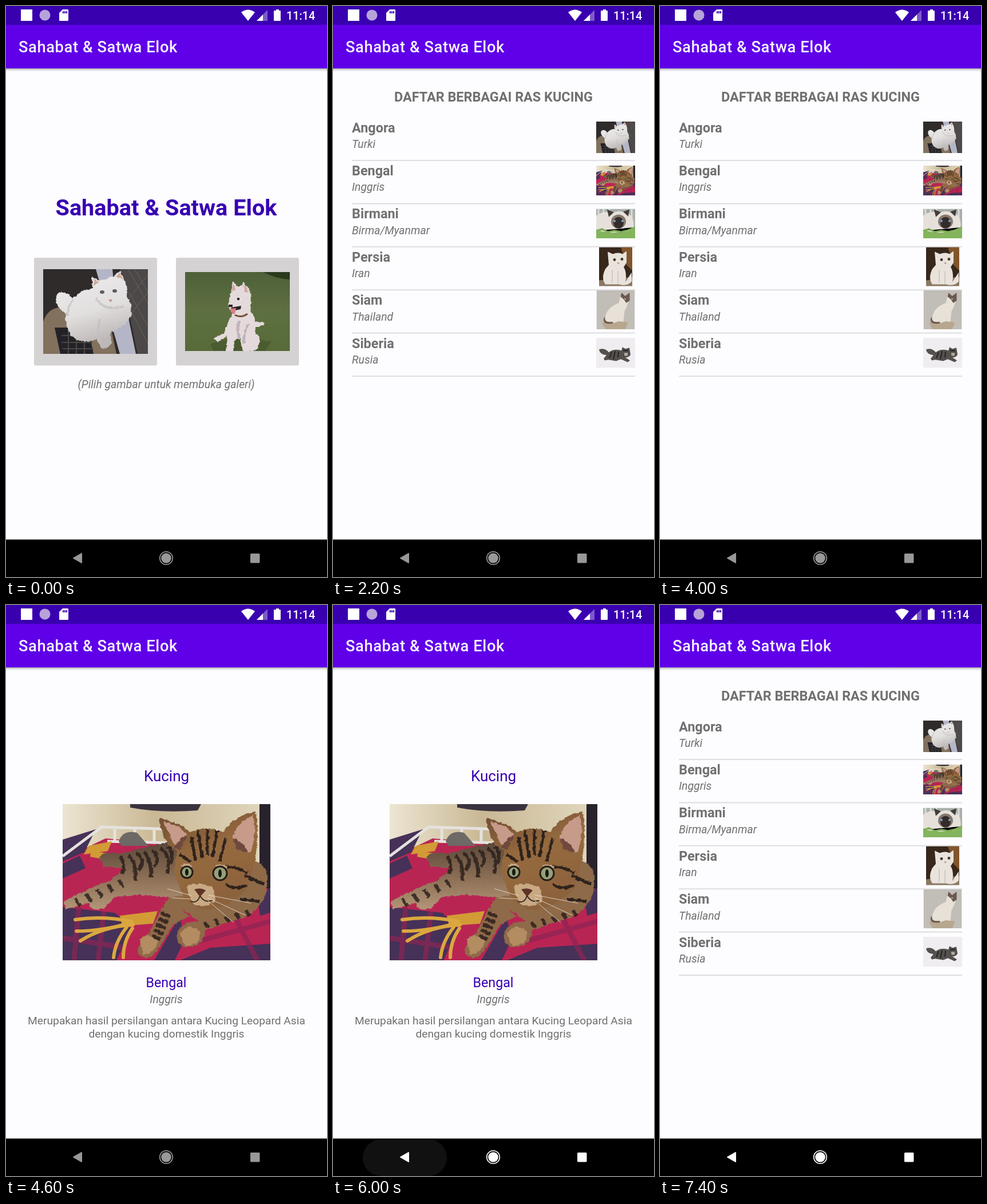
An HTML page for the animation above (8 s loop, 561 by 998 pixels).

```html
<!DOCTYPE html>
<html lang="id">
<meta charset="utf-8">
<title>Sahabat &amp; Satwa Elok</title>
<style>
  html, body { margin: 0; width: 100%; height: 100%; overflow: hidden; background: #000; }
  svg { display: block; }
  text { font-family: Roboto, sans-serif; fill: #707070; }
  .mid { text-anchor: middle; }
  .bold { font-weight: 700; font-size: 23.4px; }
  .body { font-size: 19.22px; }
  .it { font-style: italic; font-size: 19.4px; }
  .deep { fill: #3700b3; }
  .fur { filter: url(#fuzz); }
</style>
<svg id="stage" width="561" height="998" viewBox="0 0 561 998">
  <defs>
    <linearGradient id="shade" x2="0" y2="1">
      <stop stop-color="#000" stop-opacity=".34"/><stop offset=".5" stop-color="#000" stop-opacity=".09"/><stop offset="1" stop-color="#000" stop-opacity="0"/>
    </linearGradient>
    <linearGradient id="lawn" x2="0" y2="1">
      <stop stop-color="#4e6038"/><stop offset=".5" stop-color="#5e7041"/><stop offset="1" stop-color="#576a37"/>
    </linearGradient>
    <linearGradient id="wall" x2="1" y2="0">
      <stop stop-color="#ece5d2"/><stop offset=".45" stop-color="#c9b894"/><stop offset="1" stop-color="#e2d8bf"/>
    </linearGradient>
    <linearGradient id="flank" x2="0" y2="1">
      <stop stop-color="#594638"/><stop offset=".55" stop-color="#8f7258"/><stop offset="1" stop-color="#b79a7b"/>
    </linearGradient>
    <linearGradient id="face" x2=".4" y2="1">
      <stop stop-color="#6f4c30"/><stop offset=".5" stop-color="#966a3f"/><stop offset="1" stop-color="#8c623c"/>
    </linearGradient>
    <linearGradient id="white" x2=".3" y2="1">
      <stop stop-color="#efedee"/><stop offset=".6" stop-color="#e2dfdf"/><stop offset="1" stop-color="#bdb8b7"/>
    </linearGradient>
    <filter id="fuzz" x="-5%" y="-5%" width="110%" height="110%">
      <feTurbulence type="fractalNoise" baseFrequency=".16" numOctaves="2" seed="4"/>
      <feDisplacementMap in="SourceGraphic" scale="6" xChannelSelector="R" yChannelSelector="G"/>
      <feGaussianBlur stdDeviation=".5"/>
    </filter>

    <symbol id="angora" viewBox="0 0 183 148" preserveAspectRatio="none">
      <path fill="#2f2b2a" d="M0 0H183V148H0z"/>
      <path fill="#4c4847" d="M134 0H183V148H165z"/>
      <path fill="#b4b5c6" d="M92 0H121L124 30L150 90L162 148H134z"/>
      <path stroke="#696361" fill="none" d="M148 0L183 60M160 0L183 40M183 10L150 50M183 40L152 80M150 40L183 100M152 70L183 130"/>
      <path fill="#82715d" d="M0 148V92Q8 66 36 66L118 100L128 148z"/>
      <path fill="#232227" d="M20 102H78L88 148H30z"/>
      <path stroke="#4b4745" stroke-width="2" d="M32 116H82M32 128H86M34 139H88M44 104V148M58 104V148M72 104V148"/>
      <g class="fur">
        <path fill="url(#white)" d="M21 50Q24 40 36 40Q46 42 52 52Q64 36 86 34L85 14L102 20Q113 15 123 13L134 3L143 20Q147 35 146 48Q159 66 152 84Q140 104 118 109L119 130Q111 141 101 137L94 122Q70 134 50 117Q36 98 40 78Q24 68 21 50z"/>
        <path fill="none" stroke="#c3bebf" stroke-width="4" opacity=".7" d="M92 50Q106 76 141 64M99 87Q92 108 101 130M52 54Q42 66 42 82"/>
        <path fill="#cda99b" d="M87 17L98 22L90 29zM126 14L134 6L139 18z"/>
      </g>
      <path fill="#59605d" d="M99 40a4 3 0 1 0 8 0a4 3 0 1 0-8 0M121 38a4 3 0 1 0 8 0a4 3 0 1 0-8 0"/>
      <path fill="#c88f8b" d="M114 53H121L118 58z"/>
    </symbol>

    <symbol id="dog" viewBox="0 0 183 138" preserveAspectRatio="none">
      <path fill="url(#lawn)" d="M0 0H183V138H0z"/>
      <path fill="#2b3a1d" d="M136 0H183V13Q160 12 136 0z"/>
      <path fill="#42532c" opacity=".6" d="M44 126Q90 108 150 122L140 138H50z"/>
      <g class="fur">
        <path fill="#e4dadb" d="M80 36L83 17L94 27L102 18L114 33L115 56Q114 68 118 73Q128 90 122 105L130 114Q131 138 116 138H101L96 116L87 119L84 138H72L74 111L57 122L50 116L69 106Q76 83 83 73L78 63L75 55z"/>
        <path fill="#e4dadb" d="M121 86L139 89Q140 95 124 95z"/>
        <path fill="#d0a79d" d="M83 21L90 30L82 34zM102 21L111 33L104 35z"/>
        <path fill="none" stroke="#c0b2bb" stroke-width="4" d="M94 86Q91 102 94 116M111 90Q104 103 102 125"/>
      </g>
      <path fill="#292428" d="M76 57h7v4h-7zM91 45h4v4h-4zM80 62L98 59L97 65L83 68z"/>
      <path fill="#dc7d88" d="M79 64L89 63L87 73Q81 75 79 64z"/>
      <path fill="none" stroke="#73513a" stroke-width="3" d="M87 75Q98 81 109 73"/>
    </symbol>

    <symbol id="bengal" viewBox="0 0 363 273" preserveAspectRatio="none">
      <path fill="url(#wall)" d="M0 0H363V273H0z"/>
      <path fill="#3a333f" d="M118 0H242L236 11Q170 16 118 6z"/>
      <path fill="#28222c" d="M344 0H363V150H344z"/>
      <path fill="#b92553" d="M0 96L75 60L200 70L363 150V273H0z"/>
      <path fill="#463158" d="M0 62L58 44L38 84L0 100zM0 104L30 90L40 112L0 130zM0 180L92 190L120 218L94 273H0zM160 273L205 195L212 240L196 273zM205 273L258 251L363 244V273zM340 160L363 146V190L345 195z"/>
      <path fill="none" stroke="#8c2454" stroke-width="9" opacity=".7" d="M0 234L104 250M28 180L20 273M72 188L62 273M300 195L340 273M236 240L363 205"/>
      <path fill="none" stroke="#e5e2de" stroke-width="5" d="M0 91L68 40L196 44M78 65L190 68M91 39V67M126 40V67M160 41V67"/>
      <path fill="#d29b36" d="M45 73L86 65L79 82L37 88zM50 82L78 86L70 96L48 92zM100 195L166 187L158 209L104 213z"/>
      <path fill="none" stroke="#dba83f" stroke-width="6" stroke-linecap="round" d="M22 202Q70 195 120 205M24 222Q70 222 120 207M31 239Q70 214 123 211M112 215Q92 240 89 268M122 217Q106 240 106 268"/>
      <path fill="#6d6965" d="M98 65Q105 44 130 50L150 73H103z"/>
      <g class="fur">
        <path fill="url(#flank)" d="M64 92Q72 81 98 87L188 65L215 78L230 190L196 180L184 163Q131 155 90 163L73 182Q51 190 45 173L6 184L1 171Q44 146 83 134L108 112L72 110z"/>
        <path fill="#8e6b4a" d="M312 100Q352 92 358 125Q360 180 315 199L249 220Q249 250 212 250Q194 240 202 218Q214 205 238 205L205 180L222 197L193 211L166 255Q150 276 133 263Q127 248 147 232L184 163L290 150z"/>
        <path fill="#b38c62" d="M204 226Q222 206 240 222Q244 246 214 248zM134 236Q150 222 166 240Q160 266 140 262z"/>
        <path id="stripes" fill="none" stroke="#2d211c" stroke-width="6" opacity=".85"/>
        <path fill="url(#face)" d="M195 112L200 82L184 70Q171 47 169 25Q203 31 223 49Q250 36 280 49Q300 20 336 13Q344 34 338 85Q336 112 325 141Q304 176 255 185Q221 181 209 157Q198 135 195 112z"/>
        <path fill="#c79b8a" d="M176 31Q207 36 217 54L197 75zM297 58Q307 27 333 20Q340 51 328 85Q306 82 297 58z"/>
        <path fill="#6f4a3c" d="M195 75Q205 58 217 54L206 80zM297 58Q314 66 326 85L306 80z"/>
        <path fill="none" stroke="#2f221b" stroke-width="5" d="M236 47L244 94M253 44V89M270 46L262 92M225 58L232 99M285 60L274 100M204 88L224 101M284 109Q305 109 323 121M285 140Q302 151 321 142M318 125L352 140M310 166L345 170"/>
        <path fill="#c8a984" d="M216 144Q238 134 262 146L267 166Q252 184 228 176zM206 108Q215 100 226 108L222 113zM265 108Q276 102 288 110L284 116z"/>
      </g>
      <path fill="#5e3327" d="M230 149Q242 145 250 151L240 162z"/>
      <path fill="none" stroke="#3a2a20" stroke-width="2" d="M240 160Q236 174 224 170M240 160Q248 174 262 168"/>
      <path fill="none" stroke="#eee6d5" opacity=".8" d="M254 159L329 173M254 164L319 194M254 169L299 207M225 160L183 148M226 166L191 164"/>
      <g fill="#95a077" stroke="#231d18" stroke-width="3"><circle cx="217" cy="119" r="10"/><circle cx="275" cy="121" r="12"/></g>
      <g fill="#161715"><ellipse cx="217" cy="119" rx="3" ry="6"/><ellipse cx="275" cy="121" rx="3" ry="7"/></g>
    </symbol>

    <symbol id="birmani" viewBox="0 0 68 51" preserveAspectRatio="none">
      <path fill="#a9b0ab" d="M0 0H68V51H0z"/>
      <path stroke="#d8dcd8" stroke-width="3" d="M4 0V20M13 0V20M23 0V20M62 0V20"/>
      <path fill="#84b45c" d="M0 32H68V51H0z"/>
      <path fill="#e6e0da" d="M0 12Q12 2 26 7L40 4L56 8Q68 16 65 34Q54 42 40 40Q20 44 0 36z"/>
      <path fill="#453b38" d="M19 1L31 6L22 14zM58 1L47 5L56 13z"/>
      <ellipse cx="39" cy="22" rx="13" ry="12" fill="#85776d"/>
      <ellipse cx="39" cy="24" rx="9" ry="10" fill="#332c2b"/>
      <path fill="#84a9cc" d="M30 21a2 2 0 1 0 4 0a2 2 0 1 0-4 0M44 21a2 2 0 1 0 4 0a2 2 0 1 0-4 0"/>
      <path stroke="#7fae57" stroke-width="3" d="M0 38L10 35L20 40L32 38L44 40L56 37L68 32"/>
    </symbol>

    <symbol id="persia" viewBox="0 0 58 68" preserveAspectRatio="none">
      <path fill="#38271b" d="M0 0H58V68H0z"/>
      <path fill="#81562c" d="M38 0H58V41L48 31z"/>
      <path fill="#8a7962" d="M0 58L58 52V68H0z"/>
      <path fill="#e9e3dc" d="M15 8L24 12Q34 8 41 12L48 7L48 27L43 35Q49 44 46 61L57 44V60Q49 69 35 65H11Q3 54 11 38L17 31z"/>
      <g fill="#40362b"><circle cx="27" cy="22" r="2.4"/><circle cx="40" cy="21" r="2.4"/></g>
      <path fill="#bc8e81" d="M31 27h5l-2 3z"/>
      <path fill="none" stroke="#bcb0a5" d="M23 40V62M33 42V64"/>
    </symbol>

    <symbol id="siam" viewBox="0 0 67 68" preserveAspectRatio="none">
      <path fill="#c1bdb7" d="M0 0H67V68H0z"/>
      <path fill="#b7a78f" d="M10 57Q37 49 55 57L50 68H16z"/>
      <path fill="#e7e1d8" d="M42 10L57 16Q53 31 49 36L47 55L39 54L30 57Q13 58 16 44Q20 29 39 22z"/>
      <path fill="#6d594e" d="M42 11L44 4L50 10L58 4L58 18L52 22L48 16zM15 47Q12 57 29 55L28 58Q9 60 13 48z"/>
      <circle cx="50" cy="15" r="1.2" fill="#a9c3d5"/>
    </symbol>

    <symbol id="siberia" viewBox="0 0 68 52" preserveAspectRatio="none">
      <path fill="#efedef" d="M0 0H68V52H0z"/>
      <path fill="#54504d" d="M5 20Q15 17 22 25Q31 18 44 22L46 16L51 19L58 17L60 29Q58 34 51 34L59 39L55 42L43 37L35 40L21 38L15 39L13 36L18 30Q6 29 5 20z"/>
      <path fill="none" stroke="#252324" stroke-width="2" d="M27 25L23 35M33 23L30 37M39 24L38 34M47 22H56M48 30L55 29"/>
      <path fill="#b5aaa0" d="M49 26h6v5h-6z"/>
    </symbol>
    <clipPath id="view"><path d="M0 109H561V933H0z"/></clipPath>
  </defs>

  <g clip-path="url(#view)">
    <g id="home"></g><g id="list"></g><g id="detail"></g>
  </g>
  <path fill="url(#shade)" d="M0 109H561V115H0z"/>
  <path fill="#3900b0" d="M0 0H561V33H0z"/>
  <path fill="#5f00e9" d="M0 33H561V109H0z"/>
  <text x="22" y="81" font-size="27.3" font-weight="500" letter-spacing=".6" style="fill:#f8f4ff">Sahabat &amp; Satwa Elok</text>
  <g fill="#fff">
    <path d="M26 6h20v20h-20z"/>
    <circle cx="68" cy="16" r="9.5" fill="#b7a3da"/>
    <path fill-rule="evenodd" d="M99 6H108Q109 6 109 7V25Q109 26 108 26H94Q93 26 93 25V12zM99 9V13H101V9zM102 9V13H104V9zM105 9V13H107V9z"/>
    <path d="M411 11Q423 2 435 11L423 26z"/>
    <path d="M438 26L457 7V26z" opacity=".35"/><path d="M438 26L449 15V26z"/>
    <path d="M472 6H477V8H479Q480 8 480 9V25Q480 26 479 26H469Q468 26 468 25V9Q468 8 469 8H472z"/>
    <text x="490" y="24" font-size="19.8" font-weight="500" style="fill:#fff">11:14</text>
  </g>
  <path d="M0 932.5H561V998H0z"/>
  <rect id="ripple" x="52" y="934" width="147" height="64" rx="32" fill="#121112"/>
  <g id="keys">
    <path stroke="currentColor" stroke-width="2" stroke-linejoin="round" fill="currentColor" d="M118 965L132 957V973z"/>
    <circle cx="280" cy="965" r="11.3" fill="none" stroke="currentColor" stroke-width="1.6"/>
    <circle cx="280" cy="965" r="8.8" fill="currentColor"/>
    <rect x="427" y="957" width="16.5" height="16.5" rx="1.5" fill="currentColor"/>
  </g>
</svg>
<script>
const $ = id => document.getElementById(id);
const photo = (name, x, y, w, h) => `<use href="#${name}" x="${x}" y="${y}" width="${w}" height="${h}"/>`;
const label = (x, y, cls, words, size = '') =>
  `<text x="${x}" y="${y}" class="${cls}"${size && ` style="font-size:${size}px"`}>${words}</text>`;
const page = '<path fill="#fdfcfe" d="M0 109H561V933H0z"/>';

const card = x => `<rect x="${x}" y="441" width="215" height="188" rx="3" opacity=".06"/>
  <rect x="${x}" y="440" width="215" height="188" rx="3" fill="#d4d2d3"/>`;

// Dark bands across the flank, hind legs and forelegs
let bands = '';
for (let i = 0; i < 7; i++) bands += `M${100 + i * 14} ${92 - i * 3}q${12 + i % 3 * 4} 12 ${4 + i % 2 * 9} ${30 + i % 2 * 14}`;
for (let i = 0; i < 5; i++) {
  bands += `M${22 + i * 19} ${165 - i * 8}l9 13M${172 - i * 4} ${190 + i * 10}l16 7`;
  bands += `M${248 + i * 18} ${206 - i * 5}l7 10`;
}
$('stripes').setAttribute('d', bands);

$('home').innerHTML = page + label(280, 366, 'mid bold deep', 'Sahabat &amp; Satwa Elok', 39.6)
  + card(49) + card(297)
  + '<rect id="press" x="49" y="440" width="215" height="188" rx="3" opacity=".12"/>'
  + photo('angora', 65, 460, 183, 148) + photo('dog', 313, 465, 183, 138)
  + label(280, 668, 'mid body it', '(Pilih gambar untuk membuka galeri)');

const breeds = [
  ['Angora', 'Turki', 460, 202, 68, 55],
  ['Bengal', 'Inggris', 460, 279, 68, 52],
  ['Birmani', 'Birma/Myanmar', 460, 354.5, 68, 51.5],
  ['Persia', 'Iran', 465, 421.5, 58, 68],
  ['Siam', 'Thailand', 460.5, 497, 67, 68],
  ['Siberia', 'Rusia', 460, 580, 68, 52.5],
];
$('list').innerHTML = page + label(280.5, 167, 'mid bold', 'DAFTAR BERBAGAI RAS KUCING')
  + '<path id="row" d="M33 271H528V345H33z" opacity=".1"/>'
  + breeds.map(([name, origin, ...box], i) => {
    const y = i * 75.4;
    return label(33, 220.5 + y, 'bold', name) + label(33, 248 + y, 'body it', origin)
      + `<path fill="#dedde0" d="M33 ${269 + y}H528v2H33z"/>` + photo(name.toLowerCase(), ...box);
  }).join('');

$('detail').innerHTML = page + label(280.5, 308, 'mid deep', 'Kucing', 26)
  + photo('bengal', 99, 348, 363, 273)
  + label(280, 668, 'mid deep', 'Bengal', 23.2) + label(280, 695.5, 'mid body it', 'Inggris')
  + label(280.5, 733, 'mid body', 'Merupakan hasil persilangan antara Kucing Leopard Asia')
  + label(280.5, 755.5, 'mid body', 'dengan kucing domestik Inggris');

// Screen opens by sliding up a little while it is revealed from below
function reveal(id, p) {
  const style = $(id).style;
  style.display = p > 0 ? '' : 'none';
  style.transform = `translateY(${(1 - p) * 40}px)`;
  style.clipPath = p < 1 ? `inset(${(1 - p) * 824}px 0 0 0)` : 'none';
}

function draw(now) {
  const t = Math.floor(now % 8000 / 200) * 200;
  const ease = start => 1 - (1 - Math.min(1, Math.max(0, (t - start) / 300))) ** 3;
  const during = (from, to) => t >= from && t < to;
  reveal('list', ease(1700));
  reveal('detail', ease(4300) - ease(6100));
  $('press').style.display = during(1600, 2000) ? '' : 'none';
  $('row').style.display = during(4400, 4600) ? '' : 'none';
  $('ripple').style.opacity = during(5800, 6200) ? 1 : during(6200, 6400) ? 0.4 : 0;
  $('keys').style.color = t >= 5800 ? '#fff' : '#989898';
  requestAnimationFrame(draw);
}
draw(performance.now());
</script>
</html>
```
